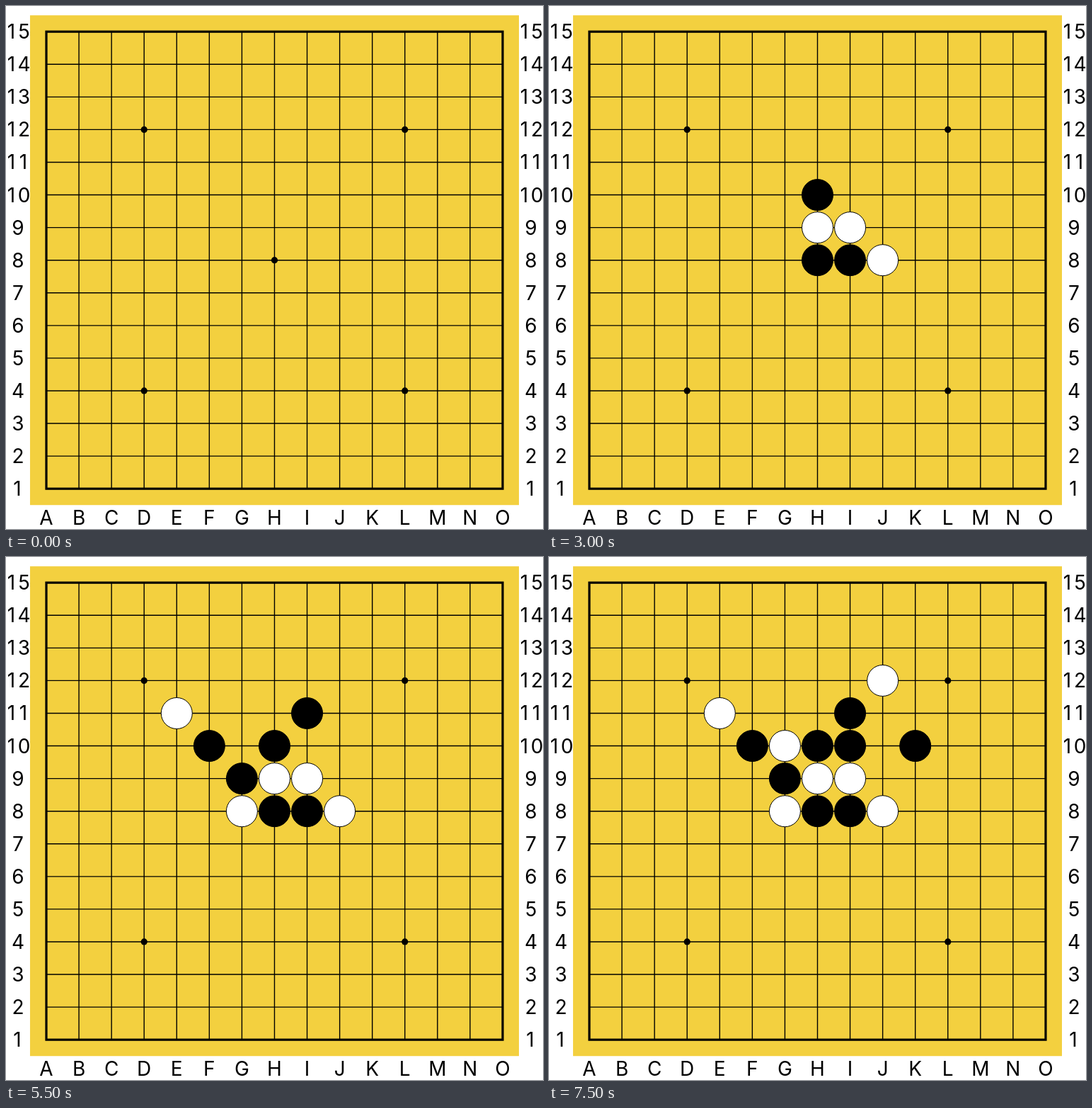
An HTML page for the animation above (8000 ms loop, 759 px wide and 738 px high).

```html
<!DOCTYPE html>
<html lang="en">
<head>
<meta charset="utf-8">
<title>Five in a row</title>
<style>
html, body { margin: 0; width: 100%; height: 100%; overflow: hidden; background: #fff; }
svg { display: block; }
text { font: 400 28px Inter, Roboto, sans-serif; text-anchor: middle; }
</style>
</head>
<body>
<svg id="stage" width="759" height="738" viewBox="0 0 759 738"></svg>
<script>
const SIZE = 15, STEP = 46.07, LEFT = 57, TOP = 36.2;
const SPAN = STEP * (SIZE - 1);
const BEAT = 500, LOOP = 8000;
const COLUMNS = "ABCDEFGHIJKLMNO";
// Black moves first, one move per beat.
const MOVES = "H8 I9 I8 J8 H10 H9 G9 G8 F10 E11 I11 J12 I10 G10 K10".split(" ");
const stage = document.getElementById("stage");

function add(tag, attrs, label) {
  const el = document.createElementNS("http://www.w3.org/2000/svg", tag);
  for (const key in attrs) el.setAttribute(key, attrs[key]);
  if (label) el.textContent = label;
  stage.appendChild(el);
  return el;
}

const colX = i => LEFT + i * STEP;
const rowY = n => TOP + (SIZE - n) * STEP;

function place(name) {
  return { cx: colX(COLUMNS.indexOf(name[0])), cy: rowY(+name.slice(1)) };
}

// Digits sit in equal cells; the narrow 1 leans slightly left.
function number(n, center) {
  const digits = [...String(n)];
  const xs = digits.map((d, i) =>
    center + (i - (digits.length - 1) / 2) * 17 - (d === "1" ? 1 : 0));
  add("text", { x: xs.join(" "), y: rowY(n) + 10 }, digits.join(""));
}

function drawBoard() {
  const side = SPAN + STEP;
  add("rect", { x: LEFT - STEP / 2, y: TOP - STEP / 2, width: side, height: side, fill: "#f3d03f" });
  let grid = "";
  for (let i = 1; i < SIZE - 1; i++) {
    grid += `M${LEFT} ${TOP + i * STEP}h${SPAN}M${colX(i)} ${TOP}v${SPAN}`;
  }
  add("path", { d: grid, stroke: "#000", "stroke-width": 1.4 });
  add("rect", { x: LEFT, y: TOP, width: SPAN, height: SPAN, fill: "none", stroke: "#000", "stroke-width": 3.2 });
  for (const star of ["D12", "L12", "H8", "D4", "L4"]) add("circle", { ...place(star), r: 4.6 });
  for (let n = 1; n <= SIZE; n++) {
    number(n, 17);
    number(n, 742);
    add("text", { x: colX(n - 1), y: 731.5 }, COLUMNS[n - 1]);
  }
}

drawBoard();
const stones = MOVES.map((move, i) => add("circle", {
  ...place(move), r: 22, fill: i % 2 ? "#fff" : "#000", stroke: "#000", visibility: "hidden"
}));

const start = performance.now();
function draw() {
  const time = (performance.now() - start) % LOOP;
  const played = Math.floor(time / BEAT);
  stones.forEach((stone, i) => stone.setAttribute("visibility", i < played ? "visible" : "hidden"));
  requestAnimationFrame(draw);
}
draw();
</script>
</body>
</html>
```
